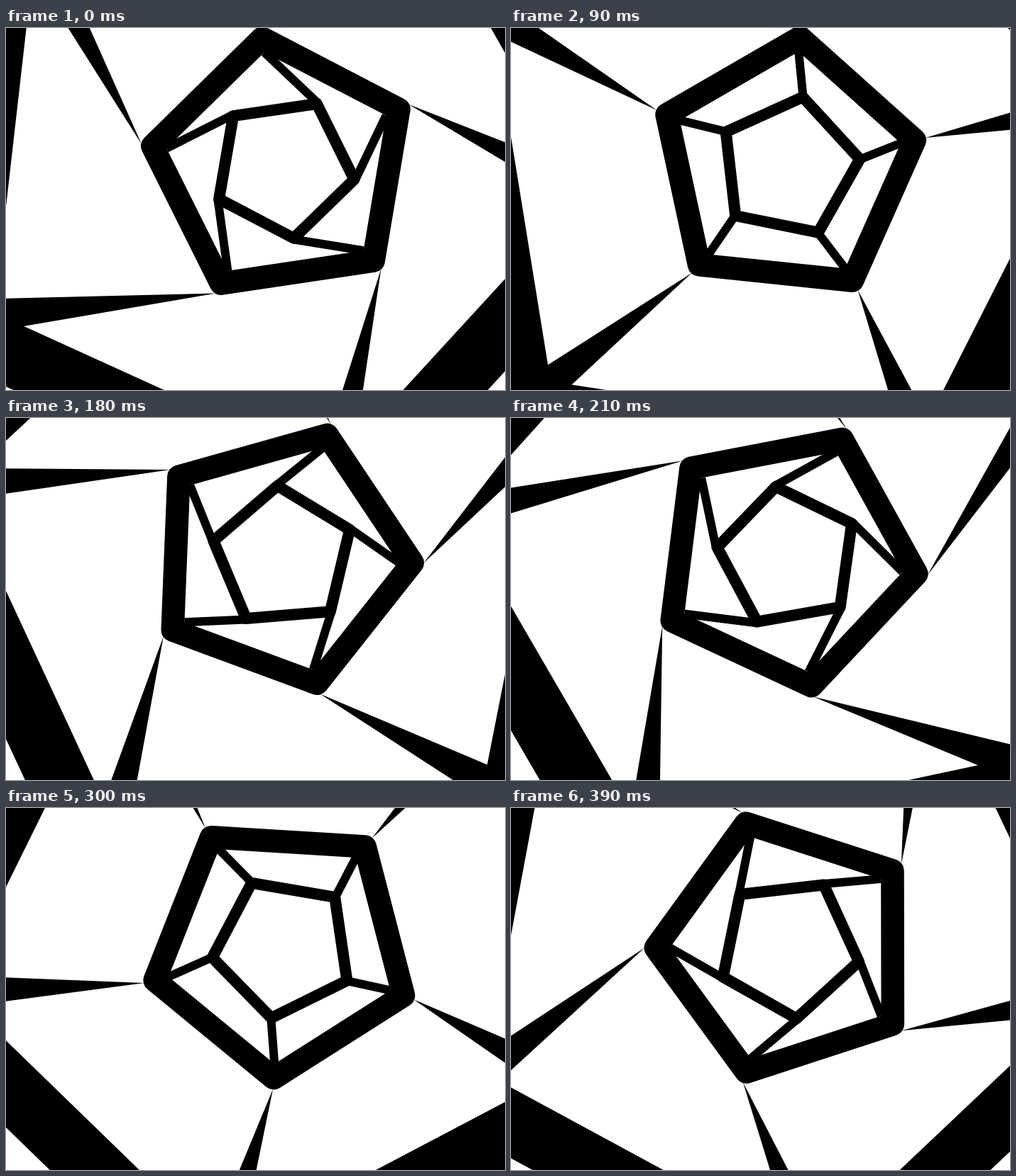
An HTML page with a canvas that plays this animation: 703x511 px, repeating every 420 ms.

```html
<!DOCTYPE html>
<html lang="en">
<head>
<meta charset="utf-8">
<title>Turning pentagons</title>
<style>
  html, body { margin: 0; width: 100%; height: 100%; overflow: hidden; background: #fff; }
  canvas { display: block; }
</style>
</head>
<body>
<canvas id="stage" width="703" height="511"></canvas>
<script>
const ctx = document.getElementById("stage").getContext("2d");
const STEP_MS = 30, STEPS = 14, SIDES = 5, SECTOR = 360 / SIDES;

// Angles are in degrees, clockwise from straight up.
function polar(ring, angle, radius = ring.radius) {
  const a = angle * Math.PI / 180;
  return [ring.x + radius * Math.sin(a), ring.y - radius * Math.cos(a)];
}

function tracePath(points) {
  ctx.beginPath();
  points.forEach(([x, y]) => ctx.lineTo(x, y));
}

function strokeRing(ring) {
  tracePath(Array.from({ length: SIDES }, (_, i) => polar(ring, ring.turn + i * SECTOR)));
  ctx.closePath();
  ctx.lineWidth = ring.width;
  ctx.stroke();
}

// Brings an angle to within half a sector of the middle value.
function wrap(angle, middle) {
  return angle - SECTOR * Math.floor((angle - middle) / SECTOR + 0.5);
}

function strokeSpoke(from, to) {
  tracePath([from, to]);
  ctx.lineWidth = 12;
  ctx.stroke();
}

function fillSpike(tip, base, baseWidth) {
  const dx = base[0] - tip[0], dy = base[1] - tip[1];
  const half = baseWidth / 2 / Math.hypot(dx, dy);
  const reach = 1.15;
  const corner = side => [
    tip[0] + reach * (dx - side * half * dy),
    tip[1] + reach * (dy + side * half * dx)
  ];
  tracePath([tip, corner(1), corner(-1)]);
  ctx.fill();
}

function draw(step) {
  const inner = { x: 390.8, y: 196.6, radius: 101.2, width: 16, turn: 27.7 - 5.4 * step };
  const middle = { x: 388.3, y: 197, radius: 184.6, width: 32.6, turn: -8.5 + 4.8 * step };
  const apothem = 361 + 0.1 * step;
  const ratio = Math.cos(Math.PI / SIDES);
  const outer = {
    x: 371.3 - 0.25 * step, y: 182, radius: (apothem + 44) / ratio,
    width: 88, turn: 24.5 - 5.23 * step
  };

  ctx.fillStyle = "#fff";
  ctx.fillRect(0, 0, 703, 511);
  ctx.fillStyle = ctx.strokeStyle = "#000";
  ctx.lineJoin = "round";
  [inner, middle, outer].forEach(strokeRing);

  // Spokes run to the inside corners of the middle ring, spikes from its outside corners.
  const insideCorner = middle.radius - middle.width / 2 / ratio;
  const innerTwist = wrap(inner.turn - middle.turn, 0.8);
  const outerTwist = wrap(outer.turn - middle.turn, -2);
  for (let i = 0; i < SIDES; i++) {
    const angle = middle.turn + i * SECTOR;
    strokeSpoke(polar(inner, angle + innerTwist, 103), polar(middle, angle, insideCorner));
    fillSpike(polar(middle, angle, 200), polar(outer, angle + outerTwist, apothem / ratio + 8), 47);
  }
}

function tick() {
  draw(Math.floor(performance.now() / STEP_MS) % STEPS);
  requestAnimationFrame(tick);
}
tick();
</script>
</body>
</html>
```
